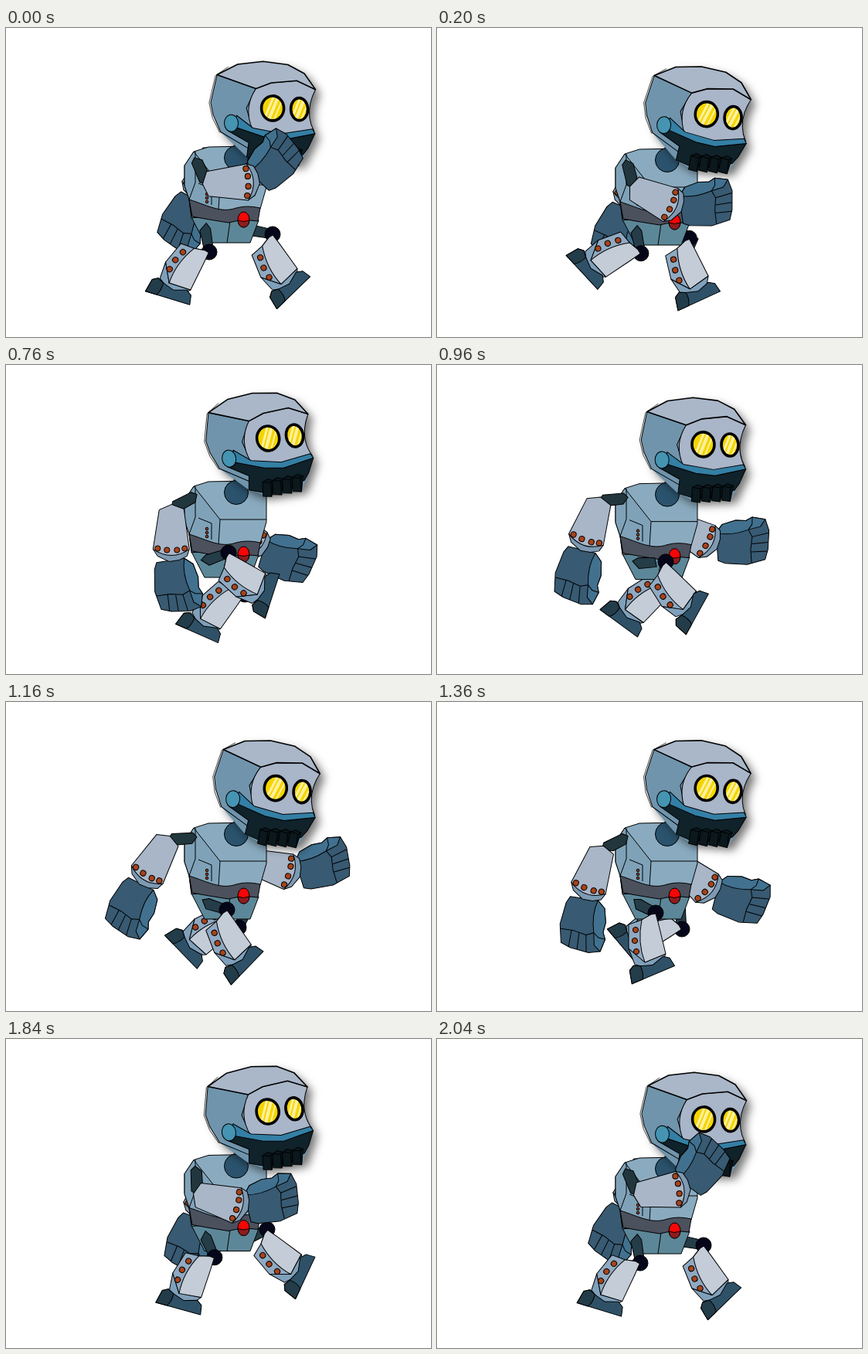
Recreate the animation shown at these times as an HTML page with a canvas. Size 550 px wide and 400 px high, loop 2080 ms.

```html
<!DOCTYPE html>
<html lang="en">
<head>
<meta charset="utf-8">
<title>Walking robot</title>
<style>
html, body { margin: 0; width: 550px; height: 400px; overflow: hidden; background: #fff; }
canvas { display: block; }
</style>
</head>
<body>
<canvas id="stage" width="550" height="400"></canvas>
<script>
const ctx = document.getElementById('stage').getContext('2d');
const LOOP = 2080, STEP = 40, RAD = Math.PI / 180;

// Rows: time, then values. Bob and head nod repeat twice per loop.
const bodyKeys = [ // dy, head rotation
  [0, 0, -1.3], [120, 3, 4.2], [320, 3, 4], [440, 1, 0],
  [640, -1, -6.2], [760, -3, -9], [800, -3.5, -9.6], [1000, 0, -1.3]
];
const nearArmKeys = [ // upper arm, forearm, wrist bend
  [0, 65, -3, -50], [120, 70, 14, -42], [320, 82, 39, -33], [440, 92, 58, -30],
  [760, 151, 90, -15], [1040, 176, 114, -10], [1160, 175, 120, -10],
  [1220, 174, 122, -10], [1360, 152, 109, -17], [1680, 112, 45, -20], [2040, 65, -8, -53]
];
const farArmKeys = [
  [0, 200, 113, -2], [440, 156, 102, -5], [760, 125, 45, -35], [1160, 72, 15, -39],
  [1220, 72, 13, -36], [1360, 82, 39, -31], [1680, 150, 98, -5], [2040, 200, 113, -2]
];
const nearLegKeys = [ // knee x, knee y, shin, foot
  [0, 263, 290, 40, 17], [120, 260, 288, 64, 46], [320, 277, 290, 74, 48],
  [440, 294, 263, 18, -4], [640, 294, 257, 8, -25], [760, 288, 246, -47, -72],
  [1040, 298, 260, -26, -55], [1160, 286, 266, -21, -46], [1360, 283, 270, 0, -23],
  [1680, 277, 281, 25, 12.6], [2040, 263, 290, 39, 17]
];
const farLegKeys = [
  [0, 345, 267, -22, -44], [440, 302, 276, 9, 8.7], [760, 309, 300, 49, 24],
  [1160, 301, 289, 64, 46], [1360, 317, 291, 71, 50], [1480, 334, 270, 40, 10],
  [1680, 345, 263, 22, 10.6], [1840, 338, 250, -40, -65], [2040, 345, 267, -22, -44]
];

// Smooth periodic interpolation that never overshoots its keys.
function pose(keys, time, period) {
  const n = keys.length, t = time % period;
  const at = i => {
    const lap = Math.floor(i / n), k = keys[i - lap * n];
    return [k[0] + lap * period, ...k.slice(1)];
  };
  let i = n - 1;
  while (keys[i][0] > t) i--;
  const [a, b, c, d] = [at(i - 1), at(i), at(i + 1), at(i + 2)];
  const h = c[0] - b[0], u = (t - b[0]) / h;
  return b.slice(1).map((_, j) => {
    const slope = (p, q) => (q[j + 1] - p[j + 1]) / (q[0] - p[0]);
    const s0 = slope(a, b), s1 = slope(b, c), s2 = slope(c, d);
    const tangent = (p, q) => p * q <= 0 ? 0 : 2 * p * q / (p + q);
    const m0 = tangent(s0, s1) * h, m1 = tangent(s1, s2) * h;
    const p = b[j + 1], q = c[j + 1];
    return p + u * (m0 + u * (3 * (q - p) - 2 * m0 - m1 + u * (m0 + m1 - 2 * (q - p))));
  });
}

function shape(d, fill, width = 1) {
  const path = new Path2D(d);
  if (fill) { ctx.fillStyle = fill; ctx.fill(path); }
  if (width) { ctx.lineWidth = width; ctx.strokeStyle = '#000'; ctx.stroke(path); }
}

function oval(x, y, rx, ry, fill, width = 1) {
  ctx.beginPath();
  ctx.ellipse(x, y, rx, ry, 0, 0, 7);
  ctx.fillStyle = fill;
  ctx.fill();
  ctx.lineWidth = width;
  ctx.strokeStyle = '#000';
  ctx.stroke();
}

const rivets = (...points) => points.forEach(([x, y]) => oval(x, y, 3.6, 3.6, '#a8431a'));

function placed(x, y, angle, draw) {
  ctx.save();
  ctx.translate(x, y);
  ctx.rotate(angle * RAD);
  draw();
  ctx.restore();
}

function drawHand() {
  shape('M0 20L4 -16 14 -25 32 -27 45 -24 54 -27 70 -21 72 -6 66 18 60 30 36 32 8 25Z', '#385a72');
  shape('M4 -16L14 -25 32 -27 45 -24 54 -27 70 -21 62 -13 46 -12Q22 -8 4 -16Z', '#41718f');
  shape('M46 -12L49 -2 44 14 42 31M49 -2L71 -3M47 7L68 9M44 17L65 20M46 -12L52 -18 54 -27', null);
}

function drawForearm() {
  shape('M54 24L63 18 70 3 68 -10 63 -20 54 -23Z', '#7d9ab3');
  shape('M3 16L-4 0 2 -16 54 -23Q70 0 54 24Z', '#a8b6c8');
  rivets([53, 18], [55, 6], [55, -7], [53, -17]);
}

function drawArm(x, y, [upper, fore, bend]) {
  const ex = x + 34 * Math.cos(upper * RAD), ey = y + 34 * Math.sin(upper * RAD);
  const wx = ex + 66 * Math.cos(fore * RAD), wy = ey + 66 * Math.sin(fore * RAD);
  placed(x, y, upper, () => shape('M-3 -1L4 -9 23 -9 35 -1 29 6 2 5Z', '#22363d'));
  placed(wx, wy, fore + bend, drawHand);
  placed(ex, ey, fore, drawForearm);
}

function drawShin() {
  shape('M-35 46L-14 64 13 53 7 67 -9 71 -27 67Z', '#7fa0bb');
  shape('M-35 15L-18 9 -6 2 -14 64 -35 46Z', '#8faac2');
  shape('M-18 9L-6 2 0 1 4 16 13 53 -14 64Q-24 38 -18 9Z', '#c3ccd7');
  rivets([-26, 22], [-27, 36], [-25, 50]);
}

function drawFoot() {
  shape('M-26 16L-22 -1 -15 -5 -7 -1 8 4 25 -1 32 4 34 16Z', '#2f5167');
  shape('M-26 16L-22 -1 -15 -5 -7 -1Q-6 9 -11 16Z', '#233c49');
}

function drawLeg(hx, hy, dy, [kx, ky, shin, foot]) {
  const angle = Math.atan2(ky - hy, kx - hx) / RAD;
  const c = Math.cos(shin * RAD), s = Math.sin(shin * RAD);
  placed(hx, hy + dy, angle, () => shape('M-4 -3L4 -7 25 -6 27 6 4 7Z', '#253d48'));
  oval(kx, ky + dy, 10, 10, '#05061a');
  placed(kx, ky + dy, shin, drawShin);
  placed(kx - 13 * c - 67 * s, ky + dy - 13 * s + 67 * c, foot, drawFoot);
}

function drawTorso() {
  shape('M240 245L257 278H316L327 249Z', '#5c8798');
  shape('M231 178L243 160 262 154 312 153 337 172V206L329 234 240 246 237 222 231 204Z', '#8aabbf');
  shape('M231 178L243 160 277 203 275 236 240 244 237 222 231 204Z', '#7fa2b8');
  shape('M245 160V200L237 222M277 203H337M290 250L286 278M249 201L266 208V229', null);
  for (const y of [215, 220, 225]) oval(260, y, 1.8, 1.8, '#8f3d20');
  shape('M237 222C262 230 278 240 298 233Q312 229 329 233L326 250Q306 247 288 252 262 248 241 244Z', '#4b515d');
  oval(307.5, 248, 7.5, 10, '#f60606');
  shape('M300 249Q307 252 315 249Q314 258 307.5 258Q301 258 300 249Z', '#8e1c1c');
  shape('M296 147L313 150 308 163 294 159Z', '#58616f');
  oval(298, 168, 15.5, 15.5, '#2b536d');
}

function drawEye(x, y, rx, ry) {
  oval(x, y, rx, ry, '#f5d500', 0.1);
  ctx.save();
  ctx.beginPath();
  ctx.ellipse(x, y, rx, ry, 0, 0, 7);
  ctx.clip();
  ctx.strokeStyle = '#fff1a0';
  for (const [offset, width] of [[-5, 3], [1, 4], [8, 2]]) {
    ctx.lineWidth = width;
    ctx.beginPath();
    ctx.moveTo(x + offset + 7, y - 16);
    ctx.lineTo(x + offset - 7, y + 16);
    ctx.stroke();
  }
  ctx.restore();
  ctx.lineWidth = 3.6;
  ctx.strokeStyle = '#000';
  ctx.beginPath();
  ctx.ellipse(x, y, rx, ry, 0, 0, 7);
  ctx.stroke();
}

function drawHead() {
  ctx.save();
  ctx.shadowColor = 'rgba(0,0,0,.55)';
  ctx.shadowBlur = 12;
  ctx.shadowOffsetX = ctx.shadowOffsetY = 6;
  shape('M275 61L302 48 335 45 367 50 388 62 402 83Q386 116 400 140L391 158 380 178 330 178 311 168 278 135 266 97Z', '#7094ac', 0);
  ctx.restore();
  shape('M275 61L266 97 269 113 278 135 313 157 320 134 312 105 325 80Z', '#7094ac');
  shape('M325 80L345 73 378 71 402 83Q397 92 395 100 390 120 399 137L356 141 319 132Q308 104 325 80Z', '#a9b5c8');
  shape('M275 61L302 48 335 45 367 50 388 62 402 83 378 71 345 73 325 80Z', '#a9b7c9', 1.6);
  shape('M273 62L264 97 268 117 277 136M273 62L290 51', null, 0.7);
  shape('M302 127L335 142 360 147 400 140 391 158 384 167 350 174 331 175 311 168 314 150 288 134Z', '#10222a');
  shape('M299 114L320 131 358 139 397 134 400 140 360 147 335 143 296 129Z', '#347fa5');
  for (const x of [330, 343, 356, 369]) {
    shape(`M${x} 161L${x + 7} 158 ${x + 14} 161 ${x + 9} 181 ${x - 2} 179Z`, '#0b181d');
    shape(`M${x} 161L${x + 10} 163 ${x + 9} 181M${x + 10} 163L${x + 14} 161`, null);
  }
  oval(292, 124, 9, 11, '#4594b2');
  drawEye(346, 106, 14.5, 16);
  drawEye(380.5, 108, 11, 14.5);
}

function drawScene(t) {
  const [dy, nod] = pose(bodyKeys, t, LOOP / 2);
  ctx.fillStyle = '#fff';
  ctx.fillRect(0, 0, 550, 400);
  ctx.lineJoin = 'round';
  drawLeg(314, 261, dy, pose(farLegKeys, t, LOOP));
  drawArm(303, 170 + dy, pose(farArmKeys, t, LOOP));
  placed(0, dy, 0, drawTorso);
  placed(298, 145 + dy, nod, () => {
    ctx.translate(-298, -146);
    drawHead();
  });
  drawLeg(257, 257, dy, pose(nearLegKeys, t, LOOP));
  drawArm(244, 171 + dy, pose(nearArmKeys, t, LOOP));
}

const start = performance.now();
function tick() {
  const elapsed = performance.now() - start;
  drawScene(Math.floor(elapsed / STEP) * STEP % LOOP);
  requestAnimationFrame(tick);
}
tick();
</script>
</body>
</html>
```
